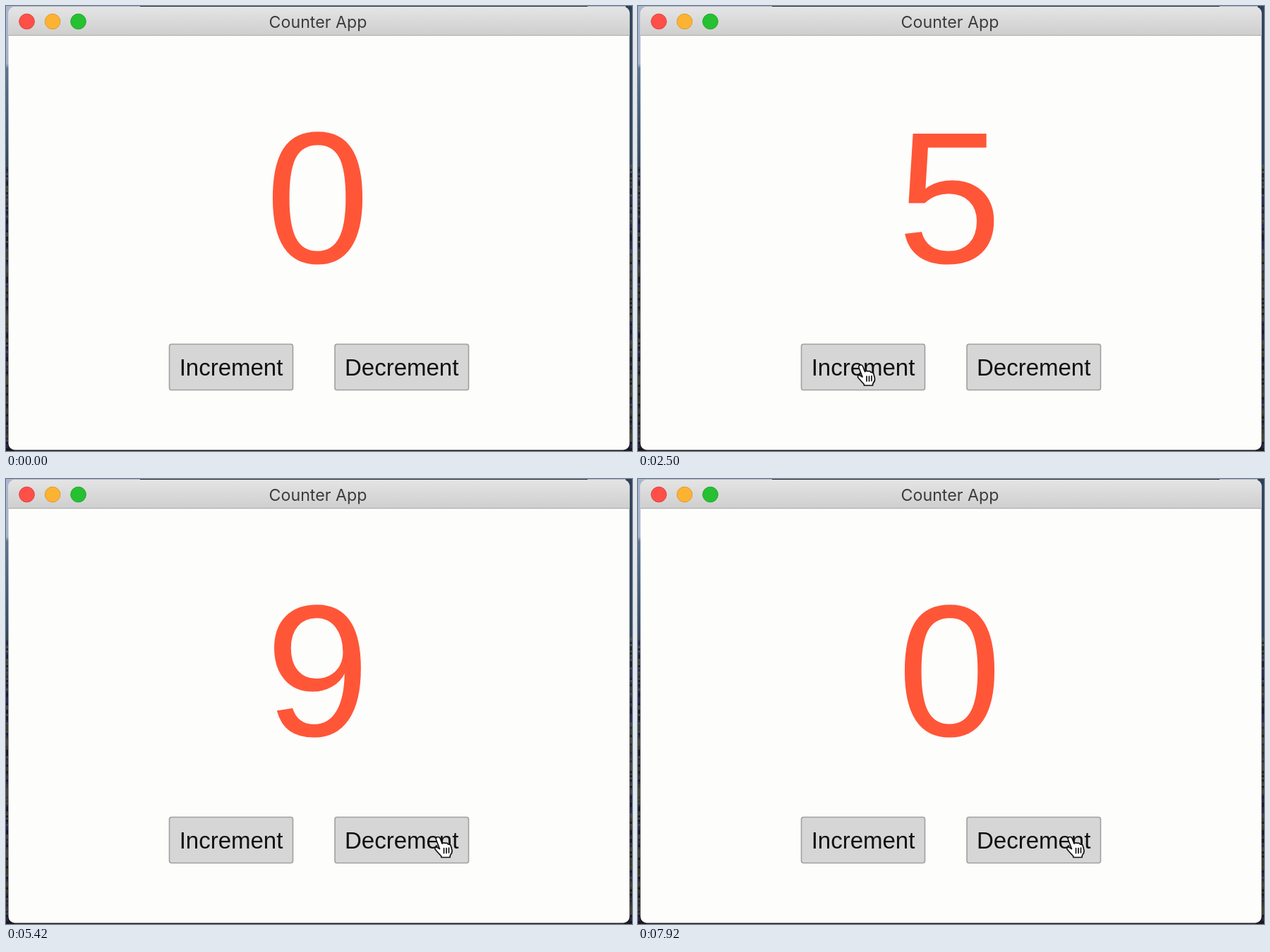
An HTML page for the animation above (8 s loop, 887 px wide and 631 px high).

```html
<!DOCTYPE html>
<html lang="en">
<head>
<meta charset="utf-8">
<title>Counter App</title>
<style>
  html, body { margin: 0; width: 100%; height: 100%; overflow: hidden; background: #26293a; }
  svg { display: block; width: 100%; height: 100%; }
  text { text-anchor: middle; }
  .title { font: 23.2px Inter, sans-serif; fill: #3c3c3c; }
  .count { font: 266px "Liberation Sans", Arial, sans-serif; fill: #ff5638; }
  .label { font: 33px "Liberation Sans", Arial, sans-serif; fill: #111; }
  .face { fill: #d6d6d6; stroke: #a0a0a0; stroke-width: 1.6; }
  .press { stroke: #949494; stroke-width: 2; stroke-linecap: round; visibility: hidden; }
</style>
</head>
<body>
<svg viewBox="0 0 887 631">
  <defs>
    <linearGradient id="desk" x2="0" y2="1">
      <stop offset="0" stop-color="#a9b6d2"/>
      <stop offset=".13" stop-color="#a3b1c8"/>
      <stop offset=".14" stop-color="#5d7592"/>
      <stop offset=".35" stop-color="#33485f"/>
      <stop offset=".42" stop-color="#2a2c42"/>
      <stop offset="1" stop-color="#1d1b20"/>
    </linearGradient>
    <linearGradient id="bar" x2="0" y2="1">
      <stop offset="0" stop-color="#e5e5e5"/>
      <stop offset="1" stop-color="#cecece"/>
    </linearGradient>
    <clipPath id="window"><rect x="3.5" y="1" width="880" height="628.5" rx="9"/></clipPath>
  </defs>

  <rect width="887" height="631" fill="url(#desk)"/>
  <rect x="190" width="634" height="2" fill="#22303c"/>
  <rect x="878" width="9" height="226" fill="#2f4059"/>
  <g id="speckles"></g>
  <g clip-path="url(#window)">
    <rect width="887" height="631" fill="#fdfdfb"/>
    <rect width="887" height="42" fill="url(#bar)"/>
    <rect y="41" width="887" height="1.2" fill="#adadad"/>
  </g>
  <g stroke-width="1">
    <circle cx="29.5" cy="22" r="10.8" fill="#fe4f49" stroke="#df423d"/>
    <circle cx="66" cy="22" r="10.8" fill="#fdb332" stroke="#dc9a34"/>
    <circle cx="102.5" cy="22" r="10.8" fill="#25c132" stroke="#25a62d"/>
  </g>
  <text class="title" x="442" y="31">Counter App</text>
  <text class="count" id="count" x="441.5" y="364">0</text>

  <rect class="face" x="231.5" y="479.5" width="175" height="65" rx="3"/>
  <path class="press" id="pressInc" d="M233 545.3H405"/>
  <text class="label" x="319" y="523.5">Increment</text>

  <rect class="face" x="466" y="479.5" width="189.5" height="65" rx="3"/>
  <path class="press" id="pressDec" d="M468 545.3H654"/>
  <text class="label" x="560.7" y="523.5">Decrement</text>

  <g id="cursor" stroke-linejoin="round" stroke-linecap="round">
    <g id="hand" stroke="#111" stroke-width="1.7">
      <path fill="#fff" d="M3 6Q2 2 6 2Q8 2 9 5L11.5 11.5Q13 9.5 16 11Q18.5 10 20 12.5Q23 12 24 15L25.5 21Q26 25 23 28L22.5 31H10.5L10 29Q7 26 1.5 19.5Q1 16 4 16.5L8 19Z"/>
      <path fill="none" d="M14 18v7M17.5 18v7M21 17.5v7"/>
    </g>
    <path id="arrow" fill="#111" stroke="#fff" stroke-width="1.6" d="M5 2V25L10 20L14 29L18 27L14 18.500H21Z"/>
  </g>
</svg>
<script>
  const LOOP = 8000, FRAME = 1000 / 12;
  const el = id => document.getElementById(id);
  const show = (node, on) => { node.style.visibility = on ? 'visible' : 'hidden'; };

  // Clicks as step numbers: nine up, then nine down.
  const ups = Array.from({ length: 9 }, (_, i) => Math.round(22 + (i - 2) * 3.8));
  const downs = Array.from({ length: 9 }, (_, i) => 68 + i * 3);
  const passed = (clicks, step) => clicks.filter(c => c <= step).length;
  const held = (clicks, step) => clicks.includes(step + 1);

  const OFF = [330, 640], INC = [310, 507], DEC = [606.5, 505.5];
  const ease = (from, to, step) => {
    const p = Math.min(1, Math.max(0, (step - from) / (to - from)));
    return p * p * (3 - 2 * p);
  };
  const mix = (a, b, p) => a.map((v, i) => v + (b[i] - v) * p);

  function onButton([x, y]) {
    const px = x + 5, py = y + 2;
    return py > 479 && py < 545 && (px > 231 && px < 407 || px > 466 && px < 656);
  }

  function draw(time) {
    const step = Math.floor((time % LOOP) / FRAME + 0.05);
    el('count').textContent = passed(ups, step) - passed(downs, step);
    show(el('pressInc'), held(ups, step));
    show(el('pressDec'), held(downs, step));
    const pos = step < 30
      ? mix(OFF, INC, ease(3, 11, step))
      : mix(INC, DEC, ease(51, 61, step));
    el('cursor').setAttribute('transform', `translate(${pos})`);
    show(el('hand'), onButton(pos));
    show(el('arrow'), !onButton(pos));
  }

  let seed = 7;
  const random = () => (seed = seed * 16807 % 2147483647) / 2147483647;
  const shades = ['#4b4a2c', '#2a2b5c', '#15151c', '#5a5a48'];
  let marks = '';
  for (let y = 225; y < 630; y += 3) {
    for (const x of [0, 884]) {
      marks += `<rect x="${x}" y="${y}" width="3" height="3" fill="${shades[Math.floor(random() * 4)]}" opacity=".6"/>`;
    }
  }
  el('speckles').innerHTML = marks;

  const start = performance.now();
  function tick() {
    draw(performance.now() - start);
    requestAnimationFrame(tick);
  }
  tick();
</script>
</body>
</html>
```
